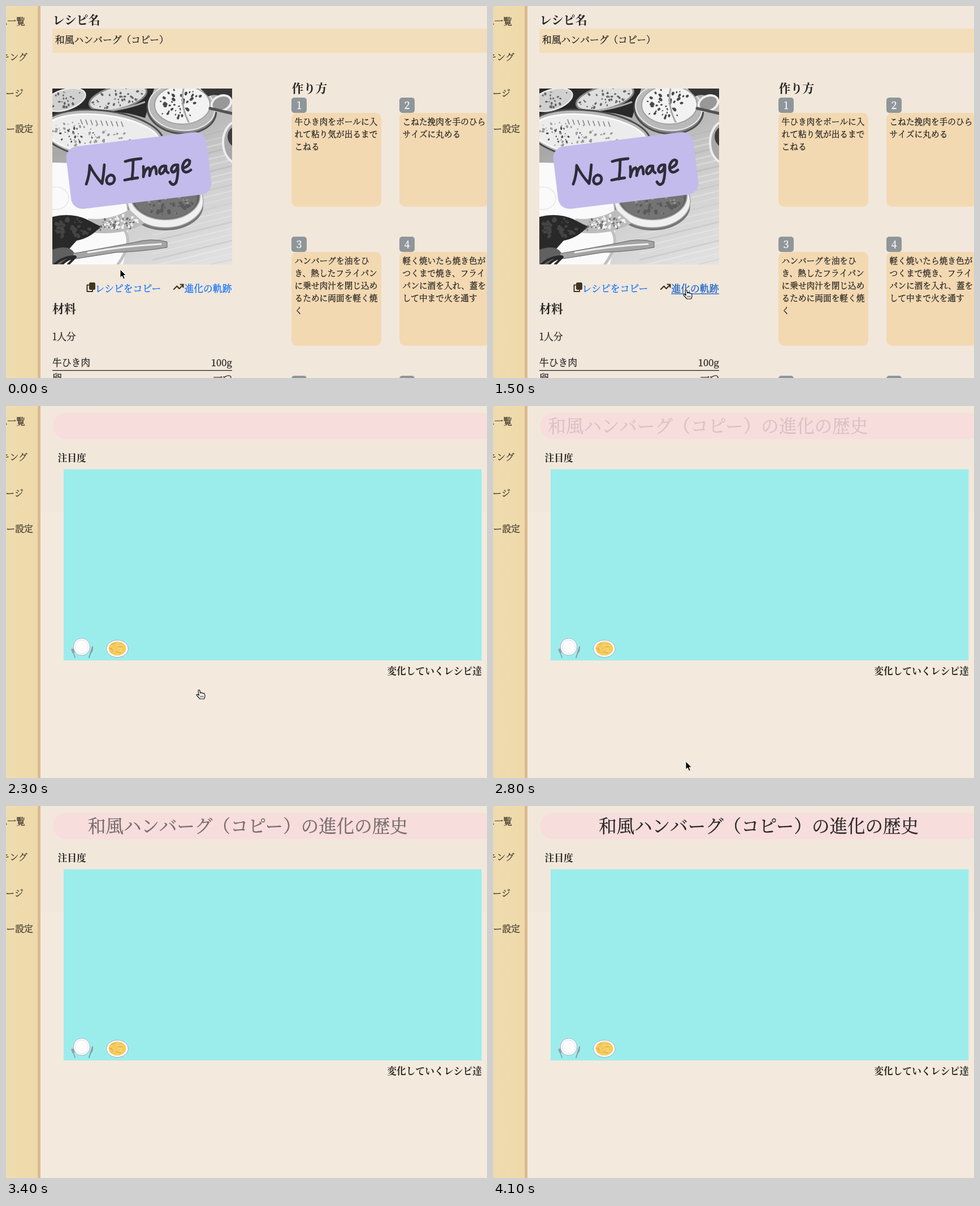
An HTML page with a canvas for the animation above (4.2 s loop, 851 px wide and 658 px high).

```html
<!DOCTYPE html>
<html lang="ja">
<head>
<meta charset="utf-8">
<title>レシピの進化</title>
<style>
html, body { margin: 0; width: 100%; height: 100%; overflow: hidden; background: #f1e7db; }
canvas { display: block; }
</style>
</head>
<body>
<canvas id="stage" width="851" height="658"></canvas>
<script>
const W = 851, H = 658, LOOP = 4200, STEP = 100;
const MOVE_TIME = 870, HOVER = 800, PAGE_SWITCH = 2300;
const LEAVE_START = 2500, LEAVE_TIME = 400;
const SLIDE_START = 2310, SLIDE_TIME = 2000;
const FONT = '"Noto Serif CJK JP", "Noto Serif JP", "Noto Serif", "Noto Sans CJK JP", "Noto Sans CJK", serif';
const BASE = 16.8, BIG = 21, SMALL = 14.7;
const INK = '#242220';

const stage = document.getElementById('stage').getContext('2d');
let ctx = stage;

function rect(x, y, w, h, color, radius = 0) {
  ctx.fillStyle = color;
  ctx.beginPath();
  ctx.roundRect(x, y, w, h, radius);
  ctx.fill();
}

function ellipse(x, y, rx, ry, fill, line, width = 1, angle = 0) {
  const p = new Path2D();
  p.ellipse(x, y, rx, ry, angle, 0, Math.PI * 2);
  path(p, fill, line, width);
}

function path(shape, fill, line, width = 1) {
  const p = new Path2D(shape);
  if (fill) { ctx.fillStyle = fill; ctx.fill(p); }
  if (line) { ctx.strokeStyle = line; ctx.lineWidth = width; ctx.stroke(p); }
}

// Places text by the vertical middle of its glyphs; a hairline gives regular text more weight.
function text(str, x, middle, size = BASE, { bold, align = 'left', color = INK } = {}) {
  const baseline = middle + size * 0.38;
  ctx.font = `${bold ? 700 : 400} ${size}px ${FONT}`;
  ctx.textAlign = align;
  ctx.fillStyle = ctx.strokeStyle = color;
  ctx.fillText(str, x, baseline);
  if (bold) return;
  ctx.lineWidth = 0.3;
  ctx.strokeText(str, x, baseline);
}

function seeded(seed) {
  return () => (seed = (seed * 16807) % 2147483647) / 2147483647;
}

function layer(draw) {
  const canvas = document.createElement('canvas');
  canvas.width = W;
  canvas.height = H;
  ctx = canvas.getContext('2d');
  ctx.lineCap = ctx.lineJoin = 'round';
  draw();
  ctx = stage;
  return canvas;
}

function speckle(x, y, rx, ry, count, color, size, angle, random) {
  const c = Math.cos(angle), s = Math.sin(angle);
  for (let i = 0; i < count; i++) {
    const a = random() * Math.PI * 2, r = Math.sqrt(random());
    const dx = Math.cos(a) * r * rx, dy = Math.sin(a) * r * ry;
    const k = size * (0.4 + random());
    ellipse(x + dx * c - dy * s, y + dx * s + dy * c, k * 1.4, k, color, null, 1, a);
  }
}

function photo() {
  const random = seeded(41);
  ctx.save();
  ctx.beginPath();
  ctx.rect(82, 146, 318, 311);
  ctx.clip();

  const table = ctx.createLinearGradient(250, 180, 390, 457);
  table.addColorStop(0, '#a8a8a8');
  table.addColorStop(0.5, '#cecece');
  table.addColorStop(1, '#e2e2e2');
  rect(82, 146, 318, 311, table);
  for (let i = 0; i < 26; i++) {
    const y = 225 + i * 11;
    path(`M260 ${y + 26} L400 ${y - 8}`, null, i % 3 ? 'rgba(255,255,255,.25)' : 'rgba(90,90,90,.12)', 1 + random() * 2);
  }

  // breads along the top
  path('M82 146 H262 L246 198 Q170 172 82 206 Z', '#292929');
  ellipse(104, 166, 38, 18, '#d0d0d0', '#f0f0f0', 2, -0.3);
  speckle(104, 166, 34, 14, 24, '#666', 1.5, -0.3, random);
  ellipse(198, 162, 52, 20, '#dedede', '#858585', 3, -0.25);
  speckle(198, 162, 46, 16, 44, '#666', 1.5, -0.25, random);
  path('M140 184 Q190 191 245 170', null, '#ababab', 3);

  ellipse(171, 228, 108, 43, '#b8b8b8', '#4b4b4b', 3, 0.12);
  ellipse(171, 229, 101, 36, '#ececec', '#fafafa', 3, 0.12);
  speckle(150, 232, 76, 25, 70, '#999', 1.5, 0.12, random);
  speckle(125, 228, 40, 15, 20, '#505050', 1.4, 0.12, random);
  for (let i = 0; i < 9; i++) path(`M${132 + i * 9} ${201 + i * 0.5} l3 8`, null, '#808080', 1.6);

  ellipse(311, 183, 61, 43, '#858585', '#4c4c4c', 3, 0.1);
  ellipse(311, 179, 59, 41, '#b9b9b9', '#e8e8e8', 2, 0.1);
  ellipse(312, 175, 49, 34, '#f2f2f2', '#a0a0a0', 2);
  speckle(312, 175, 42, 29, 50, '#484848', 1.9, 0, random);
  path('M314 147 Q308 176 323 205', null, '#aaa', 3);
  path('M344 146 H400 V168 Q370 152 358 160 Z', '#373737');
  ellipse(381, 172, 18, 13, '#989898', '#eee', 4, -0.4);
  path('M361 181 L400 190', null, '#525252', 5);
  ellipse(410, 241, 26, 37, '#a8a8a8', '#eee', 4);
  ellipse(412, 231, 20, 20, '#3c3c3c');

  // white plate, skewer and foil
  path('M82 277 Q180 276 205 325 Q226 377 207 457 H82 Z', '#fafafa');
  ellipse(88, 340, 23, 20, null, '#e6e6e6', 1.5);
  path('M205 390 Q229 415 198 457', null, '#c0c0c0', 5);

  ellipse(282, 353, 66, 43, '#777', '#777', 2);
  ellipse(282, 345, 67, 47, '#f0f0f0', '#aaa', 1.5);
  ellipse(282, 336, 61, 42, '#606060', '#999', 2);
  ellipse(282, 340, 56, 36, '#747474');
  speckle(282, 343, 49, 27, 42, '#5a5a5a', 2.4, 0, random);
  speckle(282, 343, 47, 25, 24, '#949494', 1.7, 0, random);

  path('M145 376 Q185 380 218 360 L245 384 Q210 406 154 401 Z', '#bcbcbc');
  speckle(194, 386, 36, 12, 40, '#707070', 1.7, -0.1, random);
  speckle(202, 382, 34, 11, 35, '#f2f2f2', 2, -0.1, random);
  path('M82 373 Q114 365 142 377 L167 390 Q151 410 125 415 L107 435 L82 431 Z', '#292929');
  speckle(117, 393, 32, 18, 35, '#444', 2.4, 0, random);
  path('M82 431 Q113 420 122 439 L101 457 H82 Z', '#606060');

  path('M118 438 Q180 427 228 418 Q256 410 285 417 V427 Q244 434 194 436 L124 447 Z', '#a4a4a4', '#606060', 1);
  path('M145 436 Q205 425 274 421', null, '#eee', 3);
  path('M122 443 Q101 443 86 457 M121 444 Q106 449 99 457 M123 444 L110 457', null, '#292929', 4);
  ctx.restore();
}

function noImageSign() {
  ctx.save();
  ctx.translate(235, 291);
  ctx.rotate(-0.12);
  rect(-125, -55.5, 250, 111, '#c3bbec', 20);
  ctx.restore();
  const strokes = [
    'M142 315 Q148 299 148 282 Q157 300 170 314 Q173 297 174 281',
    'M185 299 C176 301 175 315 184 315 C194 314 195 299 185 299',
    'M211 275 Q224 271 239 270 M225 273 Q225 290 223 306 M210 308 Q222 305 233 304',
    'M243 284 Q244 294 243 302 Q246 288 252 286 Q256 288 254 300 Q257 285 263 284 Q266 287 266 297',
    'M282 283 C273 281 268 294 274 297 Q280 296 283 283 Q282 293 287 295',
    'M303 281 C293 279 289 293 296 294 Q302 292 304 281 Q305 300 301 312 Q295 320 290 311',
    'M313 287 Q326 283 325 274 C318 267 310 282 313 290 Q317 298 327 290'
  ];
  strokes.forEach(d => path(d, null, '#2e2d38', 4.8));
}

function sidebar() {
  const shade = ctx.createLinearGradient(0, 0, 56, 0);
  shade.addColorStop(0, '#efdcae');
  shade.addColorStop(1, '#eed9aa');
  rect(0, 0, 56, H, shade);
  rect(56, 0, 5, H, '#dbb98f');
  const items = [['いいね一覧', 34], ['ランキング', 38], ['マイページ', 31], ['ユーザー設定', 48]];
  items.forEach(([label, right], i) =>
    text(label, right, 27 + i * 63.4, 15.9, { align: 'right', color: '#3b342b' }));
}

function step(number, x, y, lines = []) {
  rect(x, y, 27, 27, '#8f9699', 5);
  text(number, x + 13.5, y + 13, 18, { align: 'center', color: '#fff' });
  rect(x, y + 27, 159, 166, '#f3d9b2', 10);
  lines.forEach((line, i) => text(line, x + 5.5, y + 42 + i * 22.2, SMALL));
}

function copyIcon() {
  path('M146 493.5 H143.5 V505 H153 V502', null, '#41351f', 2);
  rect(147, 489, 11, 13, '#41351f', 2.5);
}

function trendIcon() {
  path('M297 501 L302.5 495.5 L306.5 500 L313 493.5 M308.5 492.5 H313.5 V497.5', null, '#41351f', 2.2);
}

function recipePage() {
  rect(0, 0, W, H, '#f1e7db');
  sidebar();
  text('レシピ名', 82.5, 24, BIG, { bold: true });
  rect(82, 40, 780, 43, '#f3debb');
  text('和風ハンバーグ（コピー）', 87, 60);
  photo();
  noImageSign();

  text('作り方', 505.5, 145, BIG, { bold: true });
  step('1', 505, 162, ['牛ひき肉をボールに入', 'れて粘り気が出るまで', 'こねる']);
  step('2', 696, 162, ['こねた挽肉を手のひら', 'サイズに丸める']);
  step('3', 505, 408, ['ハンバーグを油をひ', 'き、熱したフライパン', 'に乗せ肉汁を閉じ込め', 'るために両面を軽く焼', 'く']);
  step('4', 696, 408, ['軽く焼いたら焼き色が', 'つくまで焼き、フライ', 'パンに酒を入れ、蓋を', 'して中まで火を通す']);
  step('5', 505, 654);
  step('6', 696, 654);

  copyIcon();
  trendIcon();
  text('レシピをコピー', 157.5, 500, BASE, { color: '#0d6efd' });
  text('材料', 82, 535.5, BIG, { bold: true });
  text('1人分', 82, 585);
  text('牛ひき肉', 82, 631);
  text('100g', 400, 631, BASE, { align: 'right' });
  rect(82, 644, 318, 1.2, INK);
  text('卵', 82, 657.5);
  text('一つ', 400, 657.5, BASE, { align: 'right' });
}

function emptyPlate() {
  path('M116 430 l2 6 h2.5 l-1.5 -7 M118 430 v5 M119 436 l3 9', null, '#8e9aa5', 1.6);
  path('M153 426 L147 445', null, '#8e9aa5', 2);
  path('M153 426 Q154 433 150 437', null, '#8e9aa5', 1.5);
  ellipse(134, 426, 14.7, 15.2, '#fdfdfd', '#a3b3bd', 1);
  ellipse(134, 426, 11.5, 12, null, '#dfe3e5', 1);
}

function pastaPlate() {
  const random = seeded(9);
  ellipse(197, 429.3, 19.3, 15.2, '#fbfbfc', '#9cabc4', 1);
  ellipse(197, 429, 15.5, 12.3, '#f5cb5c');
  for (let i = 0; i < 34; i++) {
    const a = random() * Math.PI * 2, r = Math.sqrt(random());
    const x = 197 + Math.cos(a) * r * 13, y = 429 + Math.sin(a) * r * 10;
    path(`M${x - 2} ${y} q2 -2 4 0`, null, i % 2 ? '#dda33a' : '#ffe08a', 0.8);
  }
}

function historyPage() {
  rect(0, 0, W, H, '#f3eadd');
  rect(61, 0, 790, 188, '#f1e8db');
  sidebar();
  rect(83, 12, 780, 47, '#f8dddd', 23.5);
  text('注目度', 91.5, 92, BASE, { bold: true });
  rect(102, 112, 739.5, 338, '#9bedec');
  emptyPlate();
  pastaPlate();
  text('変化していくレシピ達', 842, 469, BASE, { bold: true, align: 'right' });
}

function evolutionLink(hovered) {
  const color = hovered ? '#0a58ca' : '#0d6efd';
  text('進化の軌跡', 315.5, 500, BASE, { color });
  if (hovered) rect(315.5, 508.5, 84.5, 1.2, color);
}

const clamp = v => Math.min(1, Math.max(0, v));
const mix = (a, b, k) => a + (b - a) * k;
const smooth = k => k * k * (3 - 2 * k);

// cubic-bezier(.42, 0, .58, 1)
function easeInOut(k) {
  let low = 0, high = 1;
  for (let i = 0; i < 24; i++) {
    const s = (low + high) / 2, r = 1 - s;
    if (1.26 * r * r * s + 1.74 * r * s * s + s ** 3 < k) low = s; else high = s;
  }
  return smooth(low);
}

function slidingTitle(t) {
  const k = easeInOut(clamp((t - SLIDE_START) / SLIDE_TIME));
  ctx.globalAlpha = k;
  text('和風ハンバーグ（コピー）の進化の歴史', mix(84.5, 189.5, k), 35, 31.5);
  ctx.globalAlpha = 1;
}

// Glides to the link, rests there, then drops out through the bottom edge.
function cursor(t) {
  const travel = smooth(clamp(t / MOVE_TIME));
  const leave = clamp((t - LEAVE_START) / LEAVE_TIME) ** 2;
  ctx.save();
  ctx.translate(mix(202, 341, travel), mix(466, 502, travel) + 225 * leave);
  ctx.lineJoin = 'round';
  if (t < HOVER || leave > 0) {
    path('M0 0 V14.5 L3.4 11.4 L5.8 17 L8.4 16 L6 10.5 H10.5 Z', '#000', '#fff', 1);
  } else {
    path('M-1 1.5 Q0 -.8 1.7 1 L3 6 Q4.5 4.3 5.8 6 Q7.3 5 8.4 6.6 Q10.3 6 10.7 8 L11 12 L9.5 16 H2 L-3.5 10 Q-4.5 7.5 -2 8 L.5 10 Z', '#fff', '#111', 1.2);
    path('M3.5 10.5 V13.5 M5.7 10.5 V13.5 M7.9 10.5 V13.5', null, '#111', 0.9);
  }
  ctx.restore();
}

const recipe = layer(recipePage);
const evolution = layer(historyPage);

function frame(now) {
  const t = Math.floor((now % LOOP) / STEP) * STEP;
  if (t < PAGE_SWITCH) {
    ctx.drawImage(recipe, 0, 0);
    evolutionLink(t >= HOVER);
  } else {
    ctx.drawImage(evolution, 0, 0);
    slidingTitle(t);
  }
  cursor(t);
}

const start = performance.now();
function tick() {
  frame(performance.now() - start);
  requestAnimationFrame(tick);
}
tick();
</script>
</body>
</html>
```
